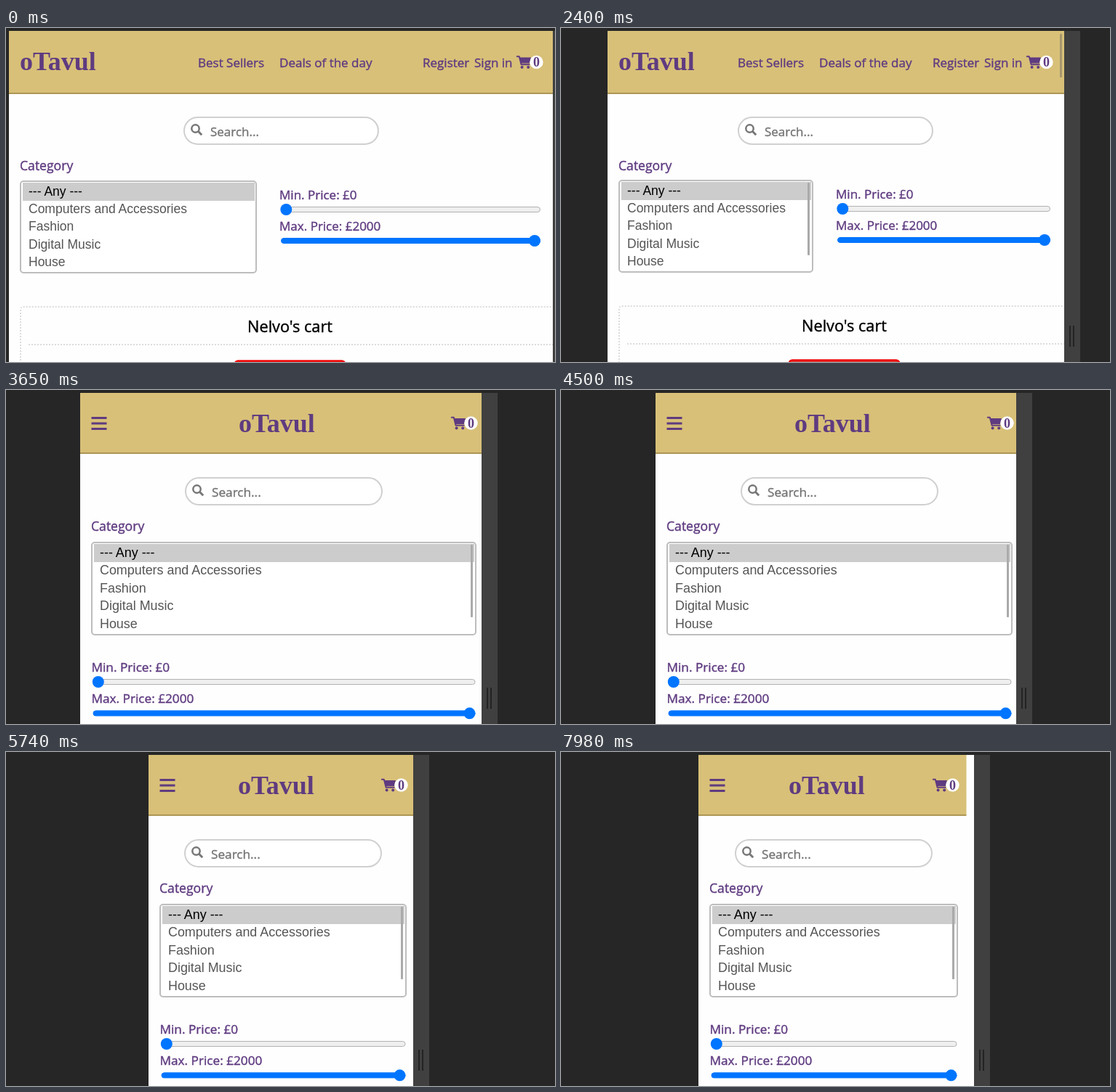
Write an HTML page that moves like this. It is 755 px wide and 460 px high and loops after 8 s.

```html
<!DOCTYPE html>
<html lang="en">
<head>
<meta charset="utf-8">
<title>Responsive shop page</title>
<style>
  html, body { margin: 0; width: 100%; height: 100%; overflow: hidden; background: #262626; }
  svg { display: block; width: 755px; height: 460px; }
  text { font: 500 17px "Open Sans", "Noto Sans", sans-serif; fill: #5f3b80; stroke: #5f3b80; stroke-width: .4px; }
  .narrow text { font-size: 17.2px; }
  #category text { font-size: 17.6px; }
  #logo text { font: bold 36px "Liberation Serif", serif; stroke: none; }
  #cart text { font: bold 18px "Liberation Serif", serif; text-anchor: middle; stroke: none; }
  #search text { fill: #757575; stroke: #757575; }
  #options text { font: 17.5px "Liberation Sans", Arial, sans-serif; fill: #555; stroke: none; }
  .narrow #options text { font-size: 17.9px; }
  #options text:first-child { fill: #000; }
  #basketTitle text { font-size: 21.7px; fill: #000; stroke: #000; text-anchor: middle; }
  .icon { fill: #5f3b80; }
  .dots { fill: none; stroke: #dcdcdc; stroke-width: 2; stroke-dasharray: 2 2; }
  .track { fill: #efefef; stroke: #b2b2b2; }
  .full .track { fill: #0075ff; stroke: #0075ff; }
  .thumb { fill: #0075ff; }
  .narrow .wide-only, svg:not(.narrow) .narrow-only, svg:not(.scrolling) .scrollbar { display: none; }
</style>
</head>
<body>
<svg id="stage" width="755" height="460">
  <clipPath id="viewport"><rect id="clip" y="4" height="456"/></clipPath>

  <g id="handle">
    <rect x="-22" y="4" width="22" height="456" fill="#404040"/>
    <path d="M-14 410v29M-9 410v29" stroke="#232323" stroke-width="2"/>
  </g>

  <g id="page"><g clip-path="url(#viewport)">
    <rect y="4" width="760" height="456" fill="#fefefe"/>

    <rect id="header" y="4" fill="#d8c078"/>
    <rect id="headerLine" height="2" fill="#ac9654"/>
    <g id="logo"><text>oTavul</text></g>
    <g id="links" class="wide-only"><text>Best Sellers</text><text x="112">Deals of the day</text></g>
    <g id="account" class="wide-only"><text>Register</text><text x="71">Sign in</text></g>
    <path class="icon narrow-only" d="M15.5 37h21v3h-21zM15.5 44.5h21v3h-21zM15.5 52h21v3h-21z"/>
    <g id="cart">
      <g class="icon">
        <path d="M4 2.4H20L18 10.4H6z"/>
        <path d="M.8 1.2H3.8L6.6 12.2H17.6" fill="none" stroke="#5f3b80" stroke-width="2" stroke-linecap="round" stroke-linejoin="round"/>
        <circle cx="7.6" cy="16" r="2"/><circle cx="16.2" cy="16" r="2"/>
      </g>
      <circle cx="27.5" cy="9" r="9.2" fill="#fff"/>
      <text x="27.5" y="15">0</text>
    </g>

    <g id="search">
      <rect id="pill" x="1" y="1" height="37" rx="18.5" fill="#fff" stroke="#d0d0d0" stroke-width="2"/>
      <g fill="none" stroke="#777" stroke-width="2.5">
        <circle cx="16.5" cy="16.5" r="5.2"/><path d="M20.3 20.3L25.2 25.2" stroke-width="3"/>
      </g>
      <text x="37" y="27">Search...</text>
    </g>

    <g id="category"><text>Category</text></g>

    <g id="content">
      <g id="select">
        <rect id="box" x="1" y="1" rx="4" fill="#fff" stroke="#bdbdbd" stroke-width="2"/>
        <rect id="chosen" x="4" y="3" height="25" fill="#ccc"/>
        <rect id="selectBar" class="scrollbar" y="4" width="3" height="100" rx="1" fill="#aaa"/>
        <g id="options">
          <text x="12">--- Any ---</text>
          <text x="12">Computers and Accessories</text>
          <text x="12">Fashion</text>
          <text x="12">Digital Music</text>
          <text x="12">House</text>
        </g>
      </g>

      <g id="minPrice">
        <text>Min. Price: £0</text>
        <rect class="track" x="2.5" y="10.5" height="7" rx="3.5"/>
        <circle class="thumb" cx="9.3" cy="14" r="8"/>
      </g>
      <g id="maxPrice" class="full">
        <text>Max. Price: £2000</text>
        <rect class="track" x="2.5" y="10.5" height="7" rx="3.5"/>
        <circle class="thumb" cy="14" r="8"/>
      </g>

      <g class="wide-only">
        <path class="dots" d="M16 470V388Q16 384 20 384H800M27 436H800"/>
        <g id="basketTitle">
          <text>Nelvo's cart</text>
          <rect x="-75.5" y="40" width="151" height="30" rx="4" fill="#d9403f" stroke="#f00808" stroke-width="2.5"/>
        </g>
      </g>
    </g>
    <g class="wide-only"><rect id="pageBar" class="scrollbar" y="8" width="3" height="60" rx="1" fill="#8c8068" opacity=".65"/></g>
  </g></g>
</svg>
<script>
const LOOP = 8000;
// time, left edge of the page, px by which the layout width trails the viewport
const KEYS = [
  [0, 4, 0], [490, 4, 0], [720, 13, 0], [870, 13, 0], [1320, 28, 1], [1670, 43, 0],
  [1710, 43, 0], [2400, 64, -2], [2490, 68, 0], [2550, 68, 0], [3170, 87, 0], [3330, 87, 0],
  [3650, 101.5, 8], [3810, 106, 0], [3950, 106, 0], [4500, 130, 10], [4760, 136, 0],
  [4820, 136, 0], [5620, 189, 0], [5670, 189, 0], [5740, 196, 6], [5910, 203, 0],
  [6110, 203, 0], [6360, 208, 0], [6630, 208, 0], [6700, 209, 0], [7220, 209, 0],
  [7670, 198, 0], [7940, 198, 0], [7980, 188.5, -7], [8000, 188.5, -7]
];
const $ = id => document.getElementById(id);
const stage = $('stage');

function sample(t) {
  const i = KEYS.findIndex(k => k[0] > t);
  const a = KEYS[i - 1], b = KEYS[i];
  const p = (t - a[0]) / (b[0] - a[0]);
  return [1, 2].map(n => a[n] + (b[n] - a[n]) * p);
}

function place(id, x, y = 0) {
  $(id).setAttribute('transform', `translate(${x} ${y})`);
}

function set(el, attrs) {
  for (const name in attrs) el.setAttribute(name, attrs[name]);
}

function slider(id, x, y, right) {
  place(id, x, y);
  set($(id).querySelector('.track'), { width: right - x - 3 });
  if (id === 'maxPrice') set($(id).querySelector('.thumb'), { cx: right - x - 8 });
}

function layout(edge, lag, scrolling) {
  const left = Math.round(edge);
  const visible = Math.round(756 - edge) - left;
  const w = visible + Math.round(lag);
  const narrow = visible < 612;
  const pick = (wide, slim) => narrow ? slim : wide;
  stage.classList.toggle('narrow', narrow);
  stage.classList.toggle('scrolling', scrolling);

  place('page', left);
  place('handle', Math.round(778 - edge));
  set($('clip'), { width: visible });

  const headerWidth = pick(visible, visible + lag * 1.5);
  set($('header'), { width: headerWidth, height: pick(85, 82) });
  set($('headerLine'), { y: pick(89, 86), width: headerWidth });
  place('logo', pick(15, w / 2 - 62), 58);
  place('links', Math.round(w * .667 - 238.6), 54);
  place('account', w - 179, 54);
  place('cart', w - 50, pick(38, 36.5));

  const pill = pick(269, 272);
  place('search', Math.round((w - pill) / 2), pick(122, 120));
  set($('pill'), { width: pill - 2 });
  place('category', 15, pick(196, 194));

  // the wide page is scaled to fit, so its lower part rises as it shrinks
  place('content', 0, pick(Math.round((w - 749) / 150), 0));

  const selectRight = pick(Math.round(w * .472 - 12), w - 15);
  const selectWidth = selectRight - 15;
  const selectTop = pick(210, 209);
  place('select', 15, selectTop);
  set($('box'), { width: selectWidth - 2, height: 336 - selectTop });
  set($('chosen'), { width: selectWidth - 7 });
  set($('selectBar'), { x: selectWidth - 8 });
  [...$('options').children].forEach((option, i) =>
    set(option, { y: Math.round(20.8 + i * pick(24.3, 24.55)) }));

  const sliderX = pick(selectRight + 31, 15.5);
  const sliderRight = w - pick(17, 16.5);
  slider('minPrice', sliderX, pick(236, 388), sliderRight);
  slider('maxPrice', sliderX, pick(279, 431.3), sliderRight);

  place('basketTitle', w / 2 + 12.5, 418.5);
  set($('pageBar'), { x: visible - 6 });
}

const start = performance.now();
function frame() {
  const t = Math.max(0, performance.now() - start) % LOOP;
  layout(...sample(t), t >= 500);
  requestAnimationFrame(frame);
}
frame();
</script>
</body>
</html>
```
